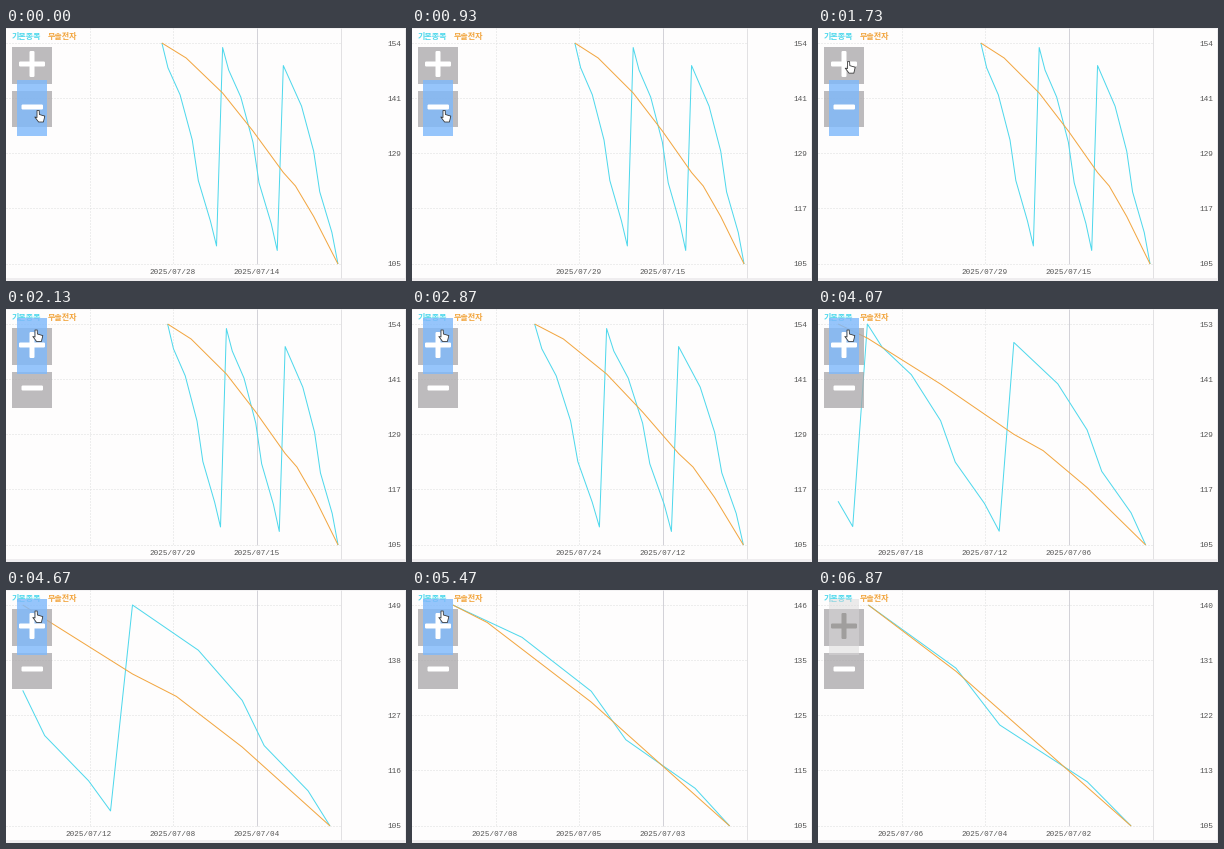
A matplotlib script that plays this animation: 400 px wide and 253 px high, repeating every 6.94 s.

```python
import numpy as np
import matplotlib.pyplot as plt
from matplotlib.animation import FuncAnimation
from matplotlib.patches import FancyBboxPatch, Polygon, Rectangle

W, H, DPI = 400, 253, 64
STEP, LOOP = 20, 6940              # ms
FPS = 15                           # rate at which the picture changes
PX = 72 / DPI                      # points per pixel
RIGHT, TOP, BOTTOM = 335, 15, 236  # plot area
SPAN = BOTTOM - TOP
QUARTERS = (0.75, 0.5, 0.25)       # date positions, counted from the right
CYAN, ORANGE, BLUE = "#4ed8ec", "#f2a640", "#7fb9fb"


def make_price():
    """Three falling ten-day waves, newest day first."""
    waves = []
    for low, high, shift in ((105, 149, 0), (108, 153, 2), (109, 154, 2.5)):
        inner = np.array([112, 121, 130, 140, 146]) + shift
        waves.append(np.interp(np.arange(10), [0, 1, 3, 4, 6, 8, 9],
                               [low, *inner, high]))
    return np.concatenate(waves)


PRICE = make_price()
TREND = np.interp(np.arange(30), [0, 4, 7, 9, 14, 19, 25, 29],
                  [0, 47.5, 78, 91.5, 133, 171, 206, 221])


def ease(t, start, end):
    u = min(max((t - start) / (end - start), 0), 1)
    return u * u * (3 - 2 * u)


def visible_days(t):
    """Zoom out a little, then far in."""
    wide = 54.6 + 2.8 * ease(t, -0.3, 0.73)
    return wide * (7.65 / 57.4) ** ease(t, 1.98, 6.41)


fig = plt.figure(figsize=(W / DPI, H / DPI), dpi=DPI, facecolor="#fefdfd")
ax = fig.add_axes([0, 0, 1, 1])
ax.set_xlim(0, W)
ax.set_ylim(H, 0)
ax.axis("off")


def rect(x0, y0, x1, y1, color, z, alpha=1):
    return ax.add_patch(Rectangle((x0, y0), x1 - x0, y1 - y0, fc=color, lw=0,
                                  alpha=alpha, zorder=z))


def line(xs, ys, color, z, style="-"):
    return ax.plot(xs, ys, color=color, lw=PX, ls=style, zorder=z,
                   solid_capstyle="butt", dash_capstyle="butt")[0]


def text(x, y, s, size, color="#555555", font="Liberation Mono", ha="center",
         weight="normal"):
    return ax.text(x, y, s, fontsize=size * PX, color=color, family=font,
                   ha=ha, va="center_baseline", weight=weight, zorder=4)


def bar(x0, y0, x1, y1):
    return ax.add_patch(FancyBboxPatch(
        (x0 + 1, y0 + 1), x1 - x0 - 2, y1 - y0 - 2, fc="white", lw=0,
        boxstyle="round,pad=1,rounding_size=1.2", zorder=8))


# Frame and grid
rect(0, 250, W, H, "#efedef", 1)
rect(399, 0, W, H, "#efedef", 1)
rect(0, 0, W, 1, "#f3f2f3", 1)
cols = [RIGHT * (1 - q) - 0.75 for q in QUARTERS]
rows = [BOTTOM - SPAN * q / 4 for q in range(5)]
dots = (0, (1, 2))
for y in rows:
    line([0, RIGHT], [int(y) - 0.5] * 2, "#dedede", 1, dots)
for x in cols[:2]:
    line([int(x) + 0.5] * 2, [0, BOTTOM], "#dedede", 1, dots)
line([250.5] * 2, [0, BOTTOM], "#d3d2d8", 1)
line([334.5] * 2, [0, 250], "#e2e1e3", 1)

# Data
price_line = line([], [], CYAN, 3)
trend_line = line([], [], ORANGE, 3)
ticks = [text(395, y, "", 7.7, ha="right") for y in rows]
dates = [text(x, 243, "", 7.6) for x in cols]
for x, name, color in ((5.5, "기본종목", CYAN), (41.5, "무솔전자", ORANGE)):
    text(x, 7, name, 8, color, "Noto Sans CJK JP", "left", "bold")

# Buttons
for y in (19, 62.5):
    rect(6, y, 46, y + 36.5, "#a9a7a9", 5, 0.76)
glow = rect(11, 52, 41, 108, BLUE, 6)
plus = [bar(13, 33.5, 39, 38.5), bar(23.5, 23, 28.5, 49)]
bar(15.5, 76.5, 37, 81.5)

# Hand cursor, fingertip at the origin
HAND = np.array([(-1, 0), (1.2, 0), (1.4, 4), (6.8, 5.6), (5.4, 11.5),
                 (0.6, 11.5), (-3.2, 6.5), (-1, 7)])
hand = ax.add_patch(Polygon(HAND, fc="white", ec="#333333", lw=0.8 * PX,
                            joinstyle="round", zorder=9))


def draw(frame):
    step = int((frame + 0.5) * STEP * FPS / 1000 + 0.1)
    t = step / FPS
    days = visible_days(t)
    n = min(len(PRICE), int(days))
    xs = RIGHT - RIGHT / days * (np.arange(n) + 0.5)
    low, high = PRICE[0], PRICE[:n].max()
    price_line.set_data(xs, BOTTOM - SPAN * (PRICE[:n] - low) / (high - low))
    trend_line.set_data(xs, BOTTOM - SPAN * TREND[:n] / TREND[n - 1])

    for q, label in enumerate(ticks):
        label.set_text(str(int(low + (high - low) * q / 4)))
    ticks[1].set_visible(step > 0)
    for q, label in zip(QUARTERS, dates):
        day = int(q * days - 0.15)
        label.set_text(f"2025/07/{day + 1:02d}" if day < len(PRICE) else "")

    u = ease(t, 1.45, 1.85)
    hand.set_xy(HAND + (32 - 2 * u, 82.5 - 61.5 * u))
    released = t > 6.86
    hand.set_visible(not released)
    glow.set_y(52 if t < 1.86 else 9)
    glow.set_facecolor("#d9d8d9" if released else BLUE)
    glow.set_alpha(0.5 if released else 0.82)
    for b in plus:
        b.set_facecolor("#a09e9d" if released else "white")
    return []


anim = FuncAnimation(fig, draw, frames=LOOP // STEP, interval=STEP,
                     init_func=lambda: draw(0), repeat=True, repeat_delay=0,
                     blit=False)
plt.show()
```
